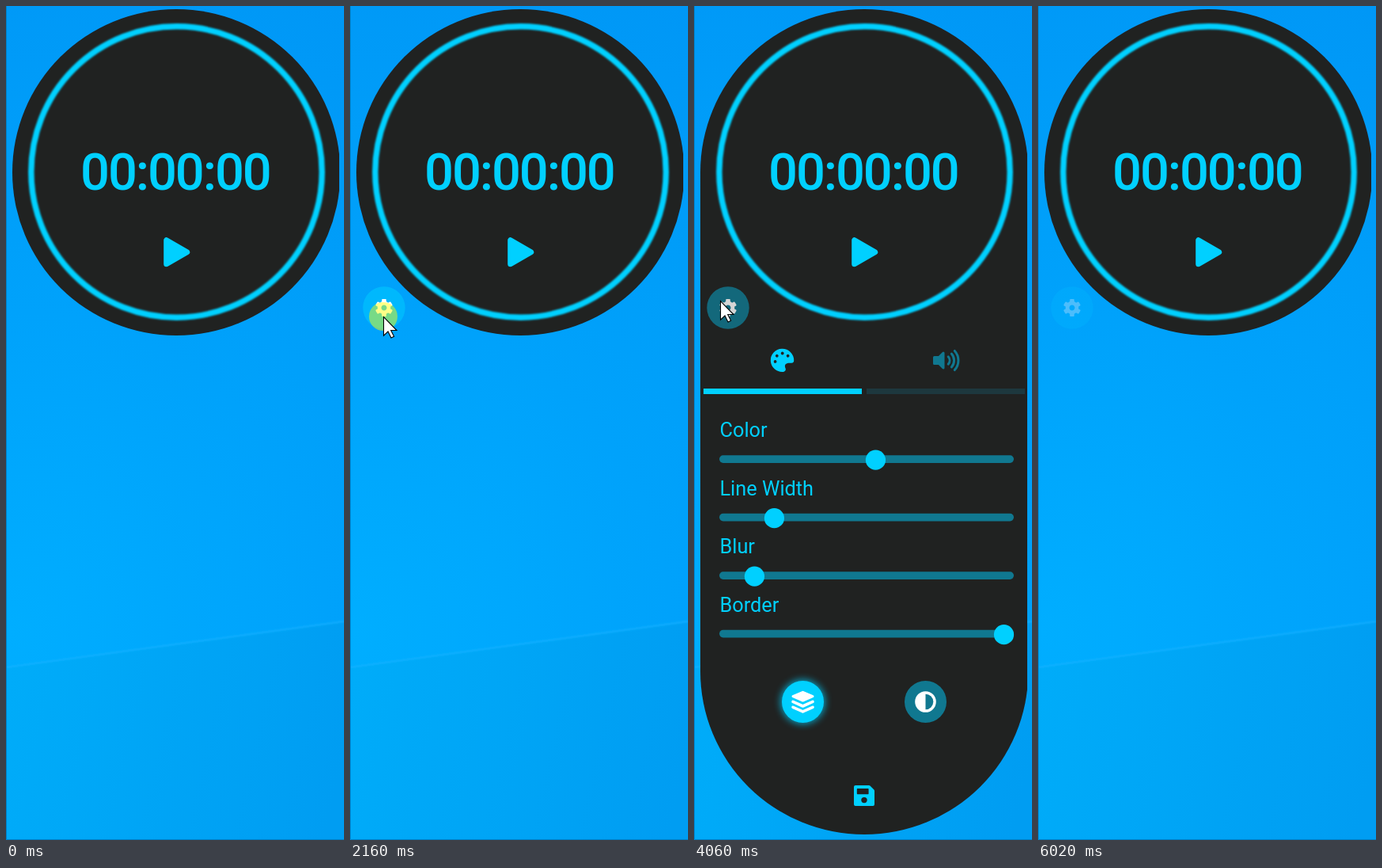
Animation, 427 px wide and 1053 px high, one loop 6.09 s. Source, as an HTML page:

```html
<!DOCTYPE html>
<html lang="en">
<head>
<meta charset="utf-8">
<title>Timer settings</title>
<style>
  html, body { margin: 0; width: 100%; height: 100%; overflow: hidden; background: #00a2fa; }
  body > svg { display: block; width: 100vw; height: 100vh; }
  text { font-family: Roboto, sans-serif; fill: #00d0ff; }
  .cyan { fill: #00d0ff; }
  .teal { fill: #107890; }
  .dark { fill: #202221; }
  .white { fill: #fff; }
  .line { fill: none; }
  .round { stroke-linejoin: round; stroke-linecap: round; }
  .time { font-size: 65px; font-weight: 500; letter-spacing: -2.05px; }
  .label { font-size: 25.3px; }
</style>
</head>
<body>
<svg viewBox="0 0 427 1053" preserveAspectRatio="none">
  <defs>
    <radialGradient id="sky" gradientUnits="userSpaceOnUse" cx="0" cy="790" r="900">
      <stop offset="0" stop-color="#00aeff"/>
      <stop offset=".45" stop-color="#00a2fb"/>
      <stop offset="1" stop-color="#0097f6"/>
    </radialGradient>
    <linearGradient id="floor" gradientUnits="userSpaceOnUse" x1="0" y1="850" x2="427" y2="950">
      <stop offset="0" stop-color="#00acf9"/>
      <stop offset="1" stop-color="#009df2"/>
    </linearGradient>
    <filter id="soft"><feGaussianBlur stdDeviation=".9"/></filter>
    <filter id="glow" x="-50%" y="-50%" width="200%" height="200%"><feGaussianBlur stdDeviation="5"/></filter>
  </defs>

  <rect width="427" height="1053" fill="url(#sky)"/>
  <path d="M0 836L427 778V1053H0z" fill="url(#floor)"/>
  <path d="M0 835L427 777" stroke="#1ab4ff" stroke-opacity=".5" stroke-width="3" filter="url(#soft)"/>
  <path class="line" d="M.5 0V1052.5H427" stroke="#0080c8"/>

  <svg width="421" height="1053">
    <rect id="body" class="dark" x="8" y="4" width="414.3" height="412" rx="207" ry="206"/>
  </svg>
  <circle class="line" cx="215.5" cy="209.5" r="183.7" stroke="#00d0ff" stroke-width="7.4" filter="url(#soft)"/>
  <text class="time" x="94" y="232">00:00:00</text>
  <path class="cyan round" d="M202.7 295.7v30l26-15z" stroke="#00d0ff" stroke-width="7"/>

  <g id="panel">
    <path class="cyan" d="M126.2 447.5A14.7 14.7 0 1 0 113 462q4.5-1.5 2-6-1-4.5 4-5.3h4q3.5-.3 3.2-3.2z"/>
    <g id="paints" class="dark"></g>
    <g class="round" stroke="#107890" stroke-width="3">
      <path class="teal" d="M303.5 443.5h6l5.5-5.5v19l-5.5-5.5h-6z"/>
      <g id="waves" class="line"></g>
    </g>
    <rect class="cyan" x="12" y="483" width="200" height="7"/>
    <rect x="218" y="483" width="200" height="7" fill="#1d383e"/>
    <g id="sliders"></g>

    <circle class="cyan" cx="137.5" cy="878.5" r="28" filter="url(#glow)" opacity=".75"/>
    <circle class="cyan" cx="137.5" cy="878.5" r="26.5"/>
    <g class="round" stroke="#fff" stroke-width="3">
      <path class="white" d="M137.5 866.3l12.5 5.4-12.5 5.4-12.5-5.4z"/>
      <path class="line" d="M125 878.4l12.5 5.6 12.5-5.6M125 885.3l12.5 5.6 12.5-5.6" stroke-width="3.6"/>
    </g>

    <circle class="teal" cx="292.5" cy="878.5" r="26.5"/>
    <circle class="white" cx="292.5" cy="878.5" r="13.3"/>
    <path class="teal" d="M292.5 868.7a9.8 9.8 0 0 1 0 19.6z"/>

    <path class="cyan round" d="M204 986h17l5 5v17h-22z" stroke="#00d0ff" stroke-width="4"/>
    <rect class="dark" x="205.8" y="988" width="14.8" height="7.3" rx=".7"/>
    <circle class="dark" cx="215" cy="1002.6" r="3.7"/>
  </g>

  <g id="gear" transform="translate(43 381)">
    <circle r="26.7" fill="#00d0ff" fill-opacity=".5"/>
    <circle class="line" r="5.9" stroke="#fff" stroke-width="4.8"/>
    <g id="teeth" class="white"></g>
  </g>

  <g id="cursor">
    <circle id="click" r="18" fill="#ff0" fill-opacity=".47"/>
    <path class="white" d="M.5.5V24.2L6 19l4 8 3.6-1.7-3.9-7.8H17z" stroke="#000" stroke-width="1.1"/>
  </g>
</svg>
<script>
const LOOP = 6090, STEP = 67.8;
const $ = id => document.getElementById(id);
const fill = (id, items, markup) => $(id).innerHTML = items.map(markup).join('');
const clamp = v => Math.min(1, Math.max(0, v));
const within = (t, from, to) => t >= from && t < to;
const show = (id, on) => $(id).style.display = on ? '' : 'none';

// Slider values run from 0 to 1.
fill('sliders', [['Color', .533], ['Line Width', .164], ['Blur', .092], ['Border', 1]], ([name, value], i) =>
  `<g transform="translate(0 ${i * 73.5})">
    <text class="label" x="32.5" y="544">${name}</text>
    <rect class="teal" x="32" y="567.3" width="372" height="9.6" rx="4.8"/>
    <circle class="cyan" cx="${44.5 + 347 * value}" cy="573.2" r="12.6"/></g>`);
fill('paints', [-2, -1, 0, 1], i =>
  `<circle cx="111.7" cy="438.5" r="1.9" transform="rotate(${i * 49} 111.7 447.7)"/>`);
fill('waves', [7, 12.6, 18], r => {
  const x = 316 + r * .74, y = r * .67;
  return `<path d="M${x} ${447.5 - y}A${r} ${r} 0 0 1 ${x} ${447.5 + y}"/>`;
});
fill('teeth', [0, 1, 2, 3, 4, 5], i =>
  `<rect x="-2.8" y="-11" width="5.6" height="6" rx="1" transform="rotate(${i * 60})"/>`);

const linear = p => p;
const easeIn = p => p * p;
const easeOut = p => 1 - (1 - p) ** 3;

// Pointer moves: start, end, target x and y, easing.
const moves = [
  [655, 1210, 48, 341, p => 1 - (1 - p) ** 1.5],
  [1210, 1490, 37, 367, linear],
  [1490, 1760, 42, 392, linear],
  [2490, 2640, 32, 370, linear],
  [2700, 2700, -6, 377, linear],
  [3820, 4255, 38, 371, easeOut],
  [5070, 5340, 396, 405, easeIn]
];

function pointer(t) {
  let x = 414, y = 101;
  for (const [start, end, toX, toY, ease] of moves) {
    if (t < start) break;
    const p = ease(clamp((t - start) / (end - start || 1)));
    x += (toX - x) * p;
    y += (toY - y) * p;
  }
  return [Math.round(x), Math.round(y)];
}

const fade = (t, start, end) => clamp(Math.min((t - start) / 290, (end - t) / 480));

function draw(t) {
  // The picture refreshes about 15 times a second.
  const tick = 660 + STEP * Math.floor((t - 652) / STEP);
  show('panel', within(t, 2300, 4740));
  $('body').setAttribute('height', within(t, 2300, 4810) ? 1042 : 412);
  $('gear').setAttribute('opacity', Math.max(fade(tick, 1195, 3680), fade(tick, 3815, 6160)));
  $('cursor').setAttribute('transform', `translate(${pointer(tick)})`);
  show('cursor', within(tick, 655, 2690) || within(tick, 3830, 5400));
  show('click', within(t, 2160, 2300) || within(t, 4670, 4740));
}

const start = performance.now();
function loop() {
  draw((performance.now() - start) % LOOP);
  requestAnimationFrame(loop);
}
loop();
</script>
</body>
</html>
```
